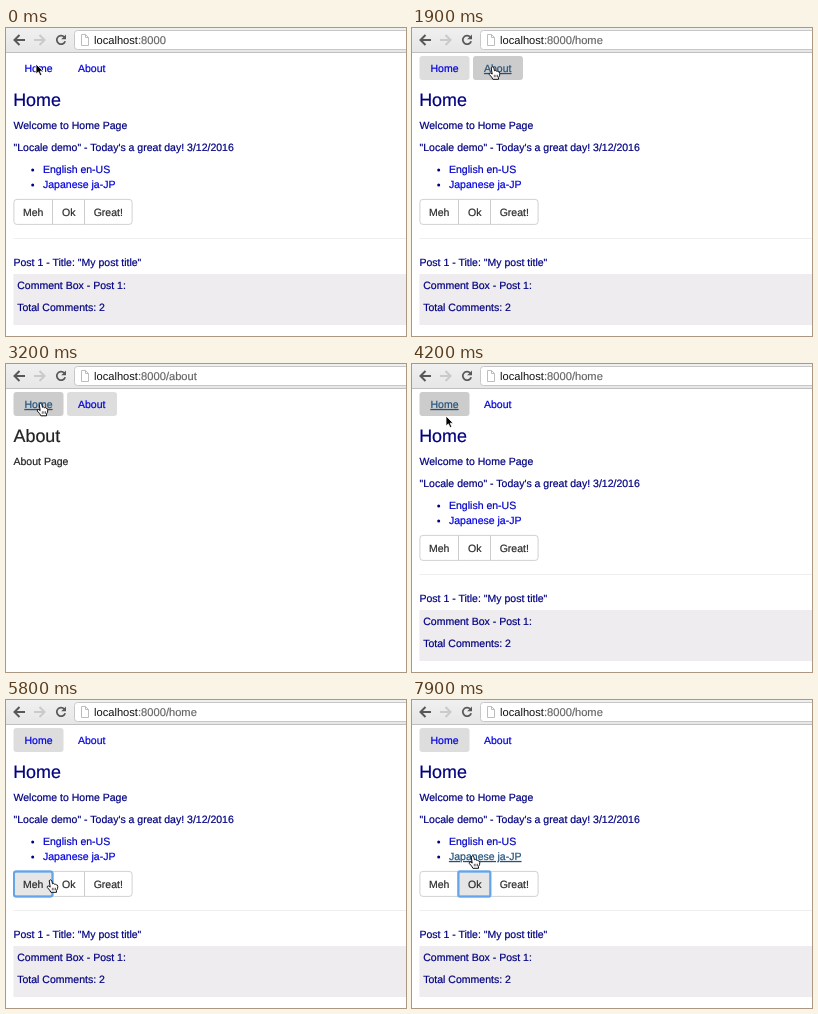
These frames come from a looping animation (400x308 px, 8000 ms). An HTML page:

```html
<!DOCTYPE html>
<html lang="en">
<head>
<meta charset="utf-8">
<title>Locale demo</title>
<style>
  html, body { margin: 0; width: 100%; height: 100%; overflow: hidden; background: #fff; }
  svg { display: block; width: 400px; height: 308px; font: 10.52px "Liberation Sans", Arial, sans-serif; }
  text { text-rendering: geometricPrecision; stroke: context-fill; }
  .link { fill: #0000e0; stroke: #0000e0; }
  .pill { fill: none; }
  .active .pill { fill: #ddd; }
  .hover .pill { fill: #ccc; }
  .hover .link { fill: #23527c; stroke: #23527c; text-decoration: underline; }
  text { stroke-width: .2px; }
  .button { fill: #2b2b2b; }
  .button text { stroke: #2b2b2b; }
  .button .face { fill: none; }
  .button.hover .face, .button.focus .face { fill: #e6e6e6; }
  .ring { display: none; fill: none; stroke: #64a5ea; stroke-width: 2; }
  .focus .ring { display: inline; filter: drop-shadow(0 0 .6px #8fc1f5); }
  .heading { font-size: 17.9px; }
  #homePage { fill: #000080; }
  #homePage > text { stroke: #000080; }
  #aboutPage { fill: #222; }
  #aboutPage > text { stroke: #222; }
</style>
</head>
<body>
<svg viewBox="0 0 400 308">
  <defs>
    <linearGradient id="chrome" x2="0" y2="1">
      <stop stop-color="#f0f0f0"/><stop offset="1" stop-color="#e6e6e6"/>
    </linearGradient>
  </defs>

  <g id="toolbar">
    <rect width="400" height="25" fill="url(#chrome)"/>
    <path d="M0 24.5H400" stroke="#c0c0c0"/>
    <rect x="68.5" y="2.5" width="340" height="19" rx="3" fill="#fff" stroke="#c8c8c8"/>
    <g fill="none" stroke="#585858" stroke-width="2">
      <path d="M19 12H9M13.5 7L8.5 12L13.5 17"/>
      <path d="M28 12H38M33.5 7L38.5 12L33.5 17" stroke="#cacaca"/>
      <path d="M58.3 9A4.3 4.3 0 1 0 59.2 13.2" stroke-width="1.7"/>
    </g>
    <path d="M60 6.5V11.3H55.2Z" fill="#585858"/>
    <path d="M75.5 6.5H79.5L82.5 9.5V17.5H75.5ZM79.5 6.5V9.5H82.5" fill="#fff" stroke="#bdbdbd"/>
    <text x="88" y="16" font-size="11.15" fill="#111" stroke="#111">localhost<tspan fill="#666" stroke="#666">:8000<tspan id="path"></tspan></tspan></text>
  </g>

  <g id="home">
    <rect class="pill" x="7.5" y="28" width="50" height="24" rx="3"/>
    <text class="link" x="18.5" y="44">Home</text>
  </g>
  <g id="about">
    <rect class="pill" x="61" y="28" width="50" height="24" rx="3"/>
    <text class="link" x="72" y="44">About</text>
  </g>

  <g id="homePage">
    <text class="heading" x="7.2" y="78.3">Home</text>
    <text x="7.5" y="100.7">Welcome to Home Page</text>
    <text x="7.5" y="122.8">"Locale demo" - Today's a great day! 3/12/2016</text>
    <circle cx="26.7" cy="142" r="1.5"/>
    <circle cx="26.7" cy="157" r="1.5"/>
    <text class="link" x="37" y="145">English en-US</text>
    <g id="japanese"><text class="link" x="37" y="160">Japanese ja-JP</text></g>

    <rect x="7.9" y="171.4" width="118.2" height="25" rx="3" fill="#fff" stroke="#ccc" stroke-width=".9"/>
    <path d="M46.5 171.4V196.4M78.5 171.4V196.4" stroke="#ccc"/>
    <g id="meh" class="button">
      <rect class="face" x="8.4" y="172" width="38" height="24" rx="2"/>
      <rect class="ring" x="8" y="171.5" width="38.5" height="25" rx="2"/>
      <text x="17" y="187.6">Meh</text>
    </g>
    <g id="ok" class="button">
      <rect class="face" x="47" y="172" width="31" height="24"/>
      <rect class="ring" x="46.4" y="171.5" width="31.9" height="25" rx="1"/>
      <text x="56" y="187.6">Ok</text>
    </g>
    <g class="button"><text x="87.7" y="187.6">Great!</text></g>

    <path d="M7.5 210.5H400" stroke="#eee"/>
    <text x="7.5" y="238">Post 1 - Title: "My post title"</text>
    <rect x="7.5" y="246" width="392.5" height="51" fill="#eeecee"/>
    <text x="11.2" y="260.7">Comment Box - Post 1:</text>
    <text x="11.2" y="282.8">Total Comments: 2</text>
  </g>

  <g id="aboutPage">
    <text class="heading" x="7.5" y="78.3">About</text>
    <text x="7.5" y="100.7">About Page</text>
  </g>

  <g id="cursor" stroke-linejoin="round">
    <path id="arrow" d="M0 0V10L2.4 7.9L4.1 11.6L5.8 10.8L4.2 7.2H7.2Z" fill="#000" stroke="#fff" stroke-width=".8"/>
    <g id="hand">
      <path d="M-1.3 1.2Q0-.6 1.3 1.2L2 4.3Q3.3 3.5 4 4.7Q5.2 4.2 5.8 5.4Q7.2 5.2 7.3 6.8Q7.4 9.6 6 11V12.8H.4Q-.3 10.8-3.2 8Q-3.7 6.4-1.9 6.5L-.3 7.6Z" fill="#fff" stroke="#111"/>
      <path d="M1.8 8.3V10.8M3.4 8.3V10.8M5 8.3V10.8" stroke="#222" stroke-width=".7"/>
    </g>
  </g>
</svg>
<script>
const LOOP = 8000, FRAME = 100;
const el = id => document.getElementById(id);

// [start time, value]
const paths = [[0, ''], [300, '/home'], [2000, '/about'], [3700, '/home']];
const hovers = [[0, ''], [100, 'home'], [1200, 'about'], [2800, 'home'], [4300, ''],
  [4800, 'meh'], [5900, 'ok'], [7400, ''], [7500, 'japanese']];
const focuses = [[0, ''], [5200, 'meh'], [6300, 'ok']];
const shapes = [[0, 'arrow'], [100, 'hand'], [4200, 'arrow'], [4800, 'hand'], [7400, 'arrow'], [7500, 'hand']];

// [time, x, y] of the pointer's hot spot
const moves = [[0, 30, 36], [100, 32, 37], [700, 35, 39], [900, 35, 39], [1500, 80.5, 38.5],
  [2400, 80.5, 38.5], [3200, 34.5, 39], [4100, 34.5, 39], [4200, 34, 52], [4900, 34, 178.5],
  [5600, 34, 178.5], [5800, 44.5, 179.5], [6300, 60.5, 178.5], [7100, 60.5, 178.5],
  [7700, 60.5, 155.5], [LOOP, 60.5, 155.5]];

const valueAt = (steps, t) => steps.findLast(([start]) => start <= t)[1];

function pointerAt(t) {
  const i = moves.findIndex(([time]) => time > t);
  const [t0, x0, y0] = moves[i - 1], [t1, x1, y1] = moves[i];
  const p = (t - t0) / (t1 - t0), eased = p * p * (3 - 2 * p);
  return [x0 + (x1 - x0) * eased, y0 + (y1 - y0) * eased];
}

const show = (id, visible) => el(id).style.display = visible ? 'inline' : 'none';

function render(t) {
  const path = valueAt(paths, t), hover = valueAt(hovers, t);
  const focus = valueAt(focuses, t), shape = valueAt(shapes, t);

  el('path').textContent = path;
  show('homePage', path !== '/about');
  show('aboutPage', path === '/about');
  for (const id of ['home', 'about', 'japanese', 'meh', 'ok']) {
    const classes = el(id).classList;
    classes.toggle('active', path === '/' + id);
    classes.toggle('hover', hover === id);
    classes.toggle('focus', focus === id);
  }
  show('arrow', shape === 'arrow');
  show('hand', shape === 'hand');
  el('cursor').setAttribute('transform', `translate(${pointerAt(t)})`);
}

const begin = performance.now();
function tick() {
  const t = (performance.now() - begin) % LOOP;
  render(Math.floor(t / FRAME) * FRAME);
  requestAnimationFrame(tick);
}
tick();
</script>
</body>
</html>
```
